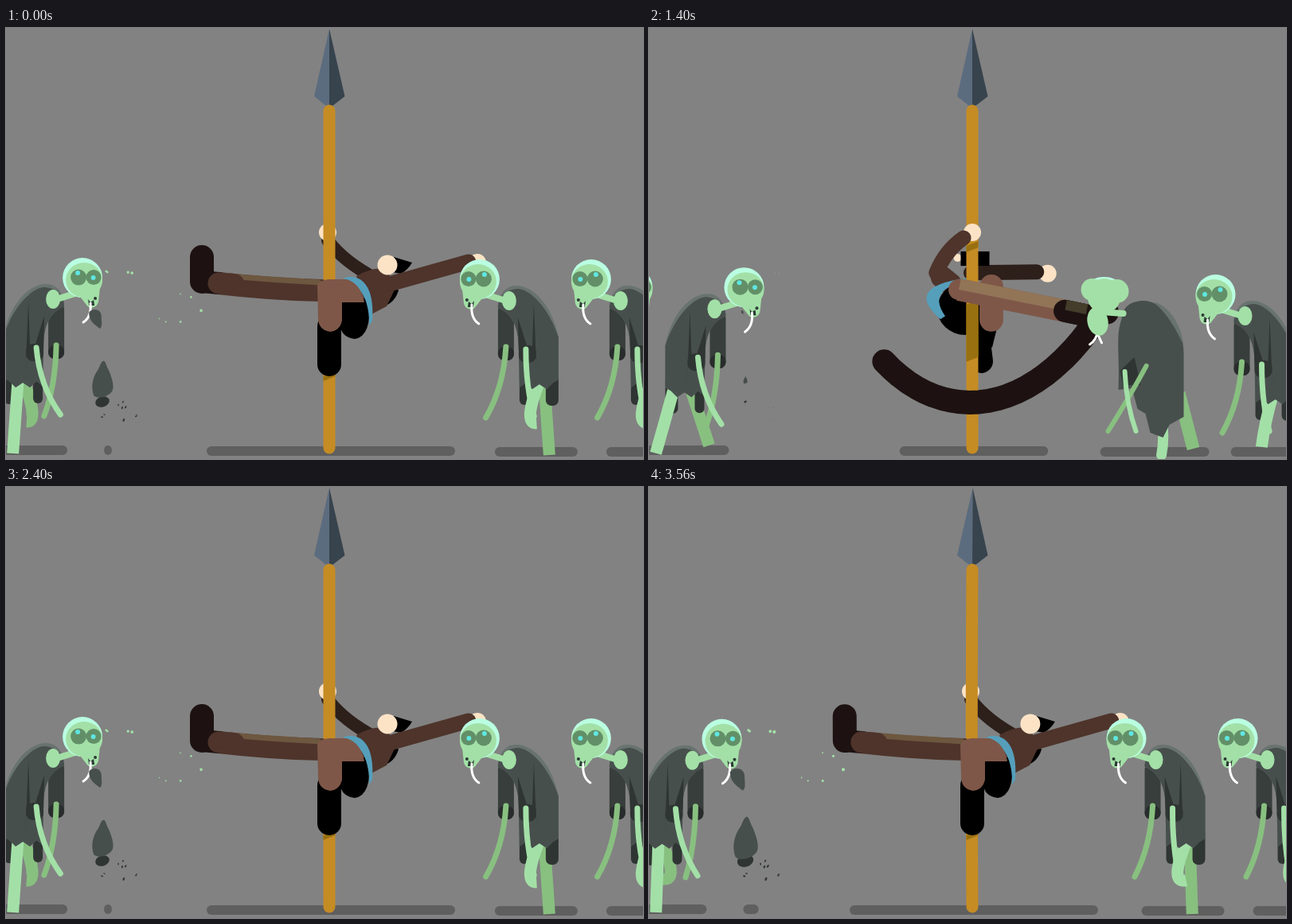
Write an HTML page with a canvas that moves like this. It is 800 px wide and 542 px high and loops after 3.6 s.

```html
<!DOCTYPE html>
<html lang="en">
<head>
<meta charset="utf-8">
<title>Pole kick</title>
<style>
html, body { margin: 0; width: 100%; height: 100%; overflow: hidden; background: #828282; }
canvas { display: block; }
</style>
</head>
<body>
<canvas id="stage" width="800" height="542"></canvas>
<script>
const ctx = document.getElementById('stage').getContext('2d');
const CYCLE = 1200, HALF = 600, GAP = 140, IMPACT = 200;
const C = {
  bg: '#828282', shade: '#5f5f5f', pole: '#c58c24', poleDark: '#99700f',
  skin: '#fde3c6', coat: '#4e342b', sleeve: '#2d1f1a', boot: '#1d1211', cuff: '#443d2b',
  pants: '#7e5748', tan: '#927457', sash: '#559fbb',
  robe: '#474f4d', robeLit: '#68736f', robeDark: '#2f3533', robeFar: '#383e3c',
  green: '#a3e0a7', greenDark: '#88c080', cap: '#bafee2', socket: '#628f68', pupil: '#5fe6e0'
};

const clamp = v => Math.max(0, Math.min(1, v));
const ramp = (t, from, span) => clamp((t - from) / span);
const smooth = v => v * v * (3 - 2 * v);
const easeOut = (v, n = 3) => 1 - (1 - v) ** n;
const lerp = (a, b, u) => a + (b - a) * u;
const mix = (a, b, u) => a.map((v, i) => lerp(v, b[i], u));
const mixPose = (a, b, u) => Object.fromEntries(Object.keys(a).map(k => [k, mix(a[k], b[k], u)]));
const wrap = t => ((t % CYCLE) + CYCLE) % CYCLE;

function random(seed) {
  return () => (seed = (seed * 16807) % 2147483647) / 2147483647;
}

function fill(d, color) { ctx.fillStyle = color; ctx.fill(new Path2D(d)); }
function stroke(d, w, color, cap = 'round') {
  ctx.lineWidth = w; ctx.strokeStyle = color; ctx.lineCap = cap; ctx.lineJoin = 'round';
  ctx.stroke(new Path2D(d));
}
function oval(x, y, rx, ry, color, rot = 0) {
  ctx.fillStyle = color; ctx.beginPath();
  ctx.ellipse(x, y, rx, ry, rot, 0, Math.PI * 2); ctx.fill();
}
const dot = (x, y, r, color) => oval(x, y, r, r, color);
function pill(x0, y0, x1, y1, r, color) {
  ctx.fillStyle = color; ctx.beginPath(); ctx.roundRect(x0, y0, x1 - x0, y1 - y0, r); ctx.fill();
}
const shadow = (x0, x1, y = 525) => { if (x1 - x0 > 1) pill(x0, y, x1, y + 12, 6, C.shade); };
const line = (a, b, w, color, cap) => stroke(`M${a} L${b}`, w, color, cap);
const bend = (a, q, b, w, color, cap) => stroke(`M${a} Q${q} ${b}`, w, color, cap);
function group(x, y, draw, sx = 1, sy = sx, rot = 0) {
  ctx.save();
  ctx.translate(x, y); ctx.rotate(rot); ctx.scale(sx, sy);
  draw();
  ctx.restore();
}

// ---------- walkers ----------
const SIDES = {
  left: { drop: 14, skew: 1, sharp: 1, foot: 0 },
  right: { drop: 19, skew: .63, sharp: 3, foot: -9 }
};
const BACK_EDGE = ['-91 345-66 322-46 322C-31 322', '-88 353-66 328-49 326C-35 326'];
const robe = edge => `M-99 387C${edge}-23 335-23 350C-41 357-49 375-49 400` +
  'L-50 450L-58 444L-66 452L-75 446L-84 452L-92 444L-99 440Z';

// Foot glides back while planted, then lifts forward in an arc
function leg(tau, bob, color, shift) {
  const ph = wrap(tau - 200), swing = ph / 650;
  const lift = swing < 1 ? Math.sin(Math.PI * swing) : 0;
  const x = swing < 1 ? lerp(-111, -46, swing) : lerp(-46, -111, (ph - 650) / 550);
  const foot = [x + shift * (1 - lift), 535 - 43 * lift];
  const hip = [lerp(-78, foot[0], .3), 440 + bob];
  bend(hip, mix(mix(hip, foot, .5), [-52, 498], lift), foot, 15, color, 'butt');
}

function walker(x, age, side) {
  const p = wrap(age) % HALF / HALF;
  const bob = side.drop * Math.sin(Math.PI * p ** side.skew) ** side.sharp;
  const sway = 23 * Math.cos((age - 95) / CYCLE * 2 * Math.PI);
  group(x, 0, () => {
    shadow(-123, -19);
    leg(age + HALF, bob, C.greenDark, side.foot + 9);
    ctx.translate(0, bob);
    pill(-43, 345, -23, 416, 8, C.robeFar);
    pill(-43, 399, -23, 416, 8, '#282c2c');
    bend([-33, 399], [-32 - sway * .1, 450], [-28 - sway, 488], 7, C.greenDark);
    pill(-99, 425, -83, 473, 7, C.robeDark);
    pill(-62, 425, -50, 472, 6, C.robeDark);
    ctx.translate(0, -bob);
    leg(age, bob, C.green, side.foot);
    ctx.translate(0, bob);
    fill(robe(BACK_EDGE[0]), C.robeLit);
    fill(robe(BACK_EDGE[1]), C.robe);
    fill('M-68 344L-66 400L-71 415L-72 442Z', C.robeDark);
    fill('M-48 362L-60 400L-49 404Z', C.robeDark);
    pill(-71, 397, -49, 419, 9, C.robeDark);
    bend([-58, 402], [-56 + sway * .1, 450], [-48 + sway, 486], 7, C.green);
    line([-36, 342], [-10, 334], 8, C.green);
    oval(-37, 341, 9, 12, C.green);
    head();
  });
}

function head() {
  stroke('M10 346C11 358 7 366 1 370', 3, '#fff');
  dot(0, 314, 25, C.cap);
  oval(2, 317, 23, 22, C.green);
  fill('M-5 332L22 325L20 344C18 353 8 354 4 347L-3 338Z', C.green);
  dot(-5, 313.5, 10, C.socket); dot(14, 313.5, 9.5, C.socket);
  dot(-6, 308, 3, C.pupil); dot(13.5, 314, 3, C.pupil);
  fill('M7 341L10 345L14 342L15 349L8 349Z', '#2b3a33');
  dot(16, 340, 2, '#2b3a33'); line([10, 346], [10, 351], 3, '#fff');
}

// Hit, with the head spun round; k crumples the body
function struck(x, k) {
  group(x, 17, () => {
    shadow(-132 + k * 40, 5 - k * 45, 508);
    line([-94, 440], [-112, 510], 16, C.greenDark, 'butt');
    bend([-68, 450], [-78, 488], [-72, 518], 13, C.green);
    ctx.translate(-50 * k, 60 * k);
    ctx.scale(1 - .4 * k, 1 - .15 * k);
    fill('M-100 390C-100 350-70 324-50 324C-32 324-23 333-22 347C-14 370-20 390-18 436L-35 434L-42 460L-52 466' +
      'L-58 490L-74 496L-82 480L-100 470Z', C.robe);
    fill('M-100 380C-96 345-73 326-62 326C-80 340-90 360-100 380Z', C.robeLit);
    fill('M-38 395L-20 412L-24 430L-46 430Z', C.robeDark);
    bend([-53, 406], [-32, 445], [-5, 488], 6, C.greenDark);
    bend([-26, 413], [-28, 455], [-40, 488], 6, C.green);
    line([-24, 340], [4, 338], 8, C.green);
    stroke('M8 362C9 370 12 375 18 379M8 366L3 377', 3, '#fff');
    oval(0, 302, 17, 8, C.cap);
    dot(-16, 312, 15, C.green); dot(15, 310, 14, C.green);
    oval(0, 318, 21, 22, C.green);
    oval(8, 350, 13, 18, C.green, .2);
  });
}

// Pieces burst out, drift and shrink away
function debris(age) {
  const s = 1.25 * ramp(age, 870, 60) * (1 - ramp(age, 930, 520));
  if (s <= 0) return;
  const out = easeOut(ramp(age, 850, 190)), drift = (age - 1040) / 40;
  const half = 44 * (1 - ramp(age, 880, 360)), rnd = random(77);
  shadow(128 - half, 128 + half);
  group(108 + drift, 371 - drift * 1.5, () =>
    fill('M-13-12C-7-22 13-20 13-4C13 7 16 17 10 22C0 14-14 6-13-12Z', C.robe), s);
  oval(121, 470, 15 * s, 11 * s, C.robeDark, -.3);
  group(121, 443, () =>
    fill('M3-41C8-38 8-30 13-22C19-8 26 12 21 22C12 36-10 40-18 32C-24 15-22-5-8-24C-4-33-2-40 3-41Z', C.robe), s);
  for (let i = 0; i < 20; i++) {
    const bit = i % 2, a = rnd(), b = rnd(), r = 1 + rnd() * 2;
    const end = bit ? [105 + 140 * a, 305 + 95 * b] : [112 + 48 * a, 470 + 28 * b];
    const [x, y] = mix(bit ? [185, 345] : [125, 440], end, out);
    oval(x + drift, y, r * (bit ? 1 : 1.8) * s, r * s, bit ? C.green : C.robeDark, a * 3);
  }
}

function horde(tau, side) {
  for (let k = 2; k >= 0; k--) {
    const age = tau - CYCLE * k, x = 96 + GAP * age / CYCLE;
    if (age < 790) walker(x, age, side);
    else if (age < 940) struck(x, ramp(age, 830, 110));
  }
  debris(tau);
  debris(tau + CYCLE);
}

// ---------- fighter ----------
const FRONT_HIT = {
  head: [388, 289], hood: [410, 290], hoodSize: [36, 18], farSh: [405, 308], farEl: [450, 308],
  farWr: [488, 308], farHand: [502, 310], sh: [361, 308], el: [372, 280], wr: [395, 264], hand: [406, 257],
  hip: [389, 329], ankle: [522, 356], heel: [555, 363], toe: [575, 358],
  sash: [412, 313, 315, 322, 366, 366, 372, 362, 345, 325, 412, 316]
};
const FRONT_REST = {
  head: [307, 295], hood: [323, 294], hoodSize: [42, 44], farSh: [312, 312], farEl: [282, 298],
  farWr: [267, 272], farHand: [263, 258], sh: [316, 323], el: [345, 284], wr: [404, 261], hand: [416, 257],
  hip: [391, 329], ankle: [529, 313], heel: [565, 309], toe: [574, 282],
  sash: [363, 311, 324, 360, 372, 390, 378, 390, 370, 350, 388, 315]
};
const BACK_HIT = {
  head: [455, 290], wr: [540, 285], hand: [554, 280], ankle: [240, 328], heel: [215, 330], toe: [200, 325]
};
const BACK_REST = {
  head: [479, 298], wr: [581, 294], hand: [592, 295], ankle: [267, 321], heel: [246, 319], toe: [246, 288]
};
const FRONT_ARC = [[295, 419], [370, 500], [480, 490], [565, 362]];
const BACK_ARC = [[570, 290], [510, 205], [300, 205], [200, 325]];

function onArc(pts, u) {
  while (pts.length > 1) pts = pts.slice(1).map((p, i) => mix(pts[i], p, u));
  return pts[0];
}

// p counts from the start of the half turn
const settle = p => easeOut(ramp(p, IMPACT, 400), 2.2);
const sweep = p => smooth(ramp(p, 110, 85));

function smear(arc, p, w) {
  const from = smooth(ramp(p, IMPACT, 45)), to = sweep(p);
  if (to - from < .02) return;
  const seg = Array.from({ length: 25 }, (_, i) => onArc(arc, lerp(from, to, i / 24)));
  stroke('M' + seg.join('L'), w, C.boot);
}

function swingLeg(pose, hip, arc, p) {
  if (p >= IMPACT) return;
  pose.toe = onArc(arc, sweep(p));
  pose.heel = mix(hip, pose.toe, .9);
  pose.ankle = mix(hip, pose.toe, .72);
}

function splitLeg(a, b, w, low, top, share) {
  line(a, b, w, low, 'butt');
  const dx = b[0] - a[0], dy = b[1] - a[1], n = Math.hypot(dx, dy) || 1, o = w * (1 - share) / 2;
  const off = q => [q[0] + dy / n * o, q[1] - Math.abs(dx) / n * o];
  line(off(a), off(b), w * share, top, 'butt');
}

function pole(p, sign, marks) {
  const lean = sign * 2.6 * Math.sin(Math.PI * ramp(p, 320, 260)), x = 406 - lean;
  fill(`M${x} 1L387 86L406 101Z`, '#5c6c7f');
  fill(`M${x} 1L425.5 86L406 101Z`, '#37434d');
  bend([406, 104], [406 + lean * 2.5, 320], [406, 528], 15, C.pole);
  for (const [y, h] of marks) fill(`M398.5 ${y + 6}L413.5 ${y}V${y + h - 6}L398.5 ${y + h}Z`, C.poleDark);
}

function front(p) {
  const u = settle(p), v = 1 - u, m = mixPose(FRONT_HIT, FRONT_REST, u), s = m.sash;
  swingLeg(m, m.hip, FRONT_ARC, p);
  for (const k of ['farEl', 'farWr', 'farHand']) m[k][1] -= 60 * Math.sin(Math.PI * u);
  const face = () => dot(...m.head, 5 + 7 * u, C.skin);
  const [w, h] = m.hoodSize;

  dot(...m.farHand, 11, C.skin);
  bend(m.farSh, m.farEl, m.farWr, 19, C.sleeve);
  face();
  group(...m.hood, () => { ctx.fillStyle = '#000'; ctx.fillRect(-w / 2, -h / 2, w, h); }, 1, 1, -.72 * u ** 4);
  if (u > .95) face();
  line([m.sh[0] + 7, m.sh[1] + 5], [357 + v * 22, 336 - v * 14], 36 - v * 8, C.coat);
  fill(`M413 330L${446 + v * 4} 337Q${433 + v * 10} 352 431 ${372 + v * 30}L405 ${365 + v * 30}Z`, v > .5 ? '#000' : C.coat);
  line([414, 373 + v * 22], [417, 419], 30, '#000');
  oval(389 + v * 8, 361 - v * 8, 22 + v * 13, 30 + v * 3, '#000');
  fill(`M${s.slice(0, 2)}Q${s.slice(2, 6)}L${s.slice(6, 8)}Q${s.slice(8)}Z`, C.sash);
  if (v > .2) line([430, 325], [430, 340 + v * 27], 30 * v, C.pants);
  pole(p, 1, [[268, 14], [342, 13 + v * 65]]);

  smear(FRONT_ARC, p, 30);
  dot(...m.hip, 13, C.pants);
  splitLeg(m.hip, m.ankle, 28, C.pants, C.tan, .5);
  stroke(`M${m.ankle}L${m.heel}L${m.toe}`, 28, C.boot, u > .95 ? 'butt' : 'round');
  dot(...m.toe, 15, C.boot);
  splitLeg(m.ankle, mix(m.ankle, m.heel, .8), 28, C.boot, C.cuff, .45);
  dot(...m.hand, 11, C.skin);
  bend(m.sh, m.el, m.wr, 19, C.coat);
}

function back(p) {
  const m = mixPose(BACK_HIT, BACK_REST, settle(p)), hip = [395, 330], dx = m.head[0] - 479;
  swingLeg(m, hip, BACK_ARC, p);
  m.toe = mix(m.toe, FRONT_ARC[0], smooth(ramp(p, 650, 60)));
  const kick = () => {
    const mid = mix(hip, m.ankle, .5);
    bend(hip, [mid[0], mid[1] + 3], m.ankle, 28, C.coat);
    bend([395, 320], [mid[0], mid[1] - 9], [m.ankle[0], m.ankle[1] - 10], 7, '#6d573f', 'butt');
    line(m.ankle, m.heel, 28, C.boot);
    line(m.heel, m.toe, 30, C.boot);
    line(m.ankle, mix(m.ankle, hip, .15), 27, C.coat);
  };
  const behind = p < IMPACT;
  smear(BACK_ARC, p, 28);
  if (behind) kick();
  bend([466 + dx * .6, 316], [424, 294], [404, 267], 16, C.sleeve);
  dot(404, 257, 11, C.skin);
  pole(p, -1, [[432, 12]]);
  if (!behind) kick();
  fill('M480 312L493 330Q488 346 474 350L462 340Z', '#000');
  fill(`M440 312Q460 300 ${477 + dx * .4} 303L490 325L478 350L455 362Z`, C.coat);
  group(dx, 0, () => fill('M487 288L510 295Q505 304 496 309L480 306Z', '#000'));
  dot(...m.head, 12.5, C.skin);
  fill('M418 340H456Q460 388 438 391Q420 389 420 372Z', '#000');
  fill('M425 314C450 308 463 330 460 368L456 374C457 346 447 322 425 317Z', C.sash);
  line([406, 375], [406, 423], 30, '#000');
  fill('M391 324Q393 317 405 316L428 316Q446 322 450 345H422V368Q419 381 407 382Q393 380 392 366Z', C.pants);
  dot(...m.hand, 11, C.skin);
  line([485, 321], m.wr, 19, C.coat);
}

function draw(now) {
  const t = now % CYCLE, p = t % HALF;
  ctx.fillStyle = C.bg;
  ctx.fillRect(0, 0, 800, 542);
  const narrow = smooth(ramp(p, 80, 85)) - easeOut(ramp(p, 165, 300));
  const half = 156 - 92 * narrow;
  shadow(408 - half, 408 + half, 526);
  if (t >= 110 && t < 710) front(t);
  else back(wrap(t - 110) + 110 - HALF);
  horde(t, SIDES.left);
  group(761, 2, () => horde(wrap(t + HALF), SIDES.right), -1, 1);
}

const start = performance.now();
function tick() {
  draw(performance.now() - start);
  requestAnimationFrame(tick);
}
tick();
</script>
</body>
</html>
```
